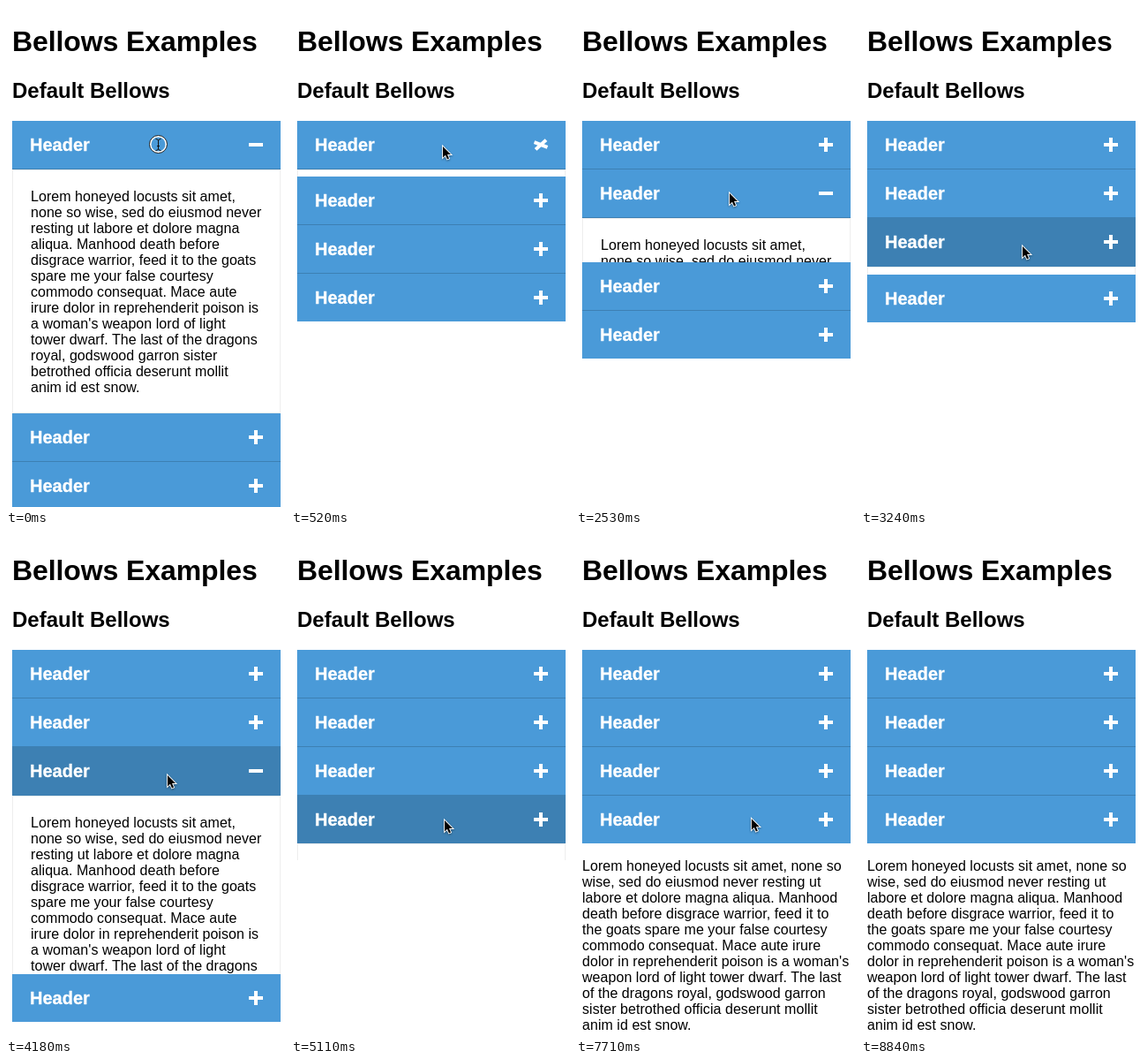
Write an HTML page that moves like this. It is 316 px wide and 567 px high and loops after 9320 ms.

```html
<!DOCTYPE html>
<html lang="en">
<head>
<meta charset="utf-8">
<title>Bellows Examples</title>
<style>
html, body { margin: 0; width: 100%; height: 100%; overflow: hidden; background: #fff; }
body { position: relative; font: 16px/18px "Liberation Sans", Arial, sans-serif; color: #000; }
h1, h2, #list, #after, svg.pointer { position: absolute; margin: 0; left: 7px; white-space: pre; }
h1 { top: 22px; font-size: 32px; line-height: 36px; letter-spacing: -.1px; }
h2 { top: 82px; font-size: 24px; line-height: 27px; }
#list { top: 130px; width: 304px; }
#after { top: 366px; }
#after, .text { letter-spacing: .05px; }
.head { position: relative; height: 54px; padding-left: 20px; font: bold 20px/54px "Liberation Sans", Arial, sans-serif;
  color: #fff; background: #4a9ad8; border-bottom: 1px solid #3d80b3; -webkit-text-stroke: .3px #fff; }
.item:last-child .head { border-bottom: 0; }
.head.down { background: #3d80b3; }
.head i { position: absolute; left: 268px; top: 25px; width: 16px; height: 4px; background: #fff; }
.panel { overflow: hidden; }
.text { box-sizing: border-box; height: 276px; padding: 21px 20px 0; border: 1px solid #eee; background: #fff; }
svg.pointer { left: 0; top: 0; overflow: visible; }
</style>
</head>
<body>
<h1>Bellows Examples</h1>
<h2>Default Bellows</h2>
<div id="list"></div>
<div id="after"></div>
<svg class="pointer" id="arrow" width="14" height="20">
  <path d="M1 2V14.5L4 11.8L6 16.4L8 15.5L6 11H10Z" stroke="#fff" stroke-width="1.8" paint-order="stroke"
    style="filter:drop-shadow(0 1px 1px #0006)"/>
</svg>
<svg class="pointer" id="ring" width="316" height="200" fill="none">
  <circle cx="172.5" cy="156.5" r="9" stroke="#fff" stroke-width="2"/>
  <circle cx="172.5" cy="156.5" r="10" stroke="#222"/>
  <path d="M169.5 150.5q3 0 3 2q0-2 3-2M172.5 152V162M169.5 163.5q3 0 3-2q0 2 3 2M171 158.5h3" stroke="#111"/>
</svg>
<script>
const LOOP = 9320, FULL = 276, SLIDE = 330, PRESS = 130;
// "|" breaks the line inside a panel, "/" in the paragraph below the list
const COPY = "Lorem honeyed locusts sit amet,| none so/ wise, sed do eiusmod never| resting ut/ labore et dolore magna| " +
  "aliqua. Manhood/ death before| disgrace warrior, feed it to/ the goats| spare me your false courtesy|/ " +
  "commodo consequat. Mace aute| irure/ dolor in reprehenderit poison is| a woman's/ weapon lord of light| " +
  "tower dwarf. The last/ of the dragons| royal, godswood garron/ sister| betrothed officia deserunt mollit|/ anim id est snow.";
const wrap = (mark, other) => COPY.replaceAll(other, "").replaceAll(mark + " ", "\n");

// When each item is clicked open and clicked closed
const clicks = [[-1000, 230], [1250, 2300], [3200, 4060], [5050, 6050]];
// Pointer: time, x, y
const path = [[0, 171, 157], [870, 171, 157], [1100, 173, 210], [2700, 173, 210], [3120, 182, 270], [4500, 182, 270],
  [4990, 173, 321], [6890, 173, 321], [7300, 195, 266], [7400, 195, 266], [7770, 198, 322], [7830, 198, 322],
  [8330, 214, 195], [8510, 214, 195], [8840, 264, 541]];

const $ = id => document.getElementById(id);
const clamp = v => Math.max(0, Math.min(1, v));
const ease = v => v < .5 ? 2 * v * v : 1 - 2 * (1 - v) ** 2;
const ramp = (t, start, length) => ease(clamp((t - start) / length));
const show = (el, on) => el.style.display = on ? "block" : "none";

$("after").textContent = wrap("/", "|");
const items = clicks.map(([open, close]) => {
  const el = document.createElement("div");
  el.className = "item";
  el.innerHTML = '<div class="head">Header<i></i><i></i></div><div class="panel"><div class="text"></div></div>';
  el.querySelector(".text").textContent = wrap("|", "/");
  $("list").append(el);
  const [head, panel] = el.children;
  return { open, close, head, panel, bars: head.querySelectorAll("i") };
});

function drawItem({ open, close, head, panel, bars }, t) {
  const height = Math.round(FULL * (ramp(t, open, SLIDE) - ramp(t, close, SLIDE)));
  const turn = ramp(t, open + 110, 200) - ramp(t, close + 255, 105);
  panel.style.height = height + "px";
  head.classList.toggle("down", [open, close].some(c => t >= c && t < c + PRESS));
  bars[0].style.transform = `rotate(${180 * turn}deg)`;
  bars[1].style.transform = `rotate(${90 - 90 * turn}deg)`;
  return t >= open && t < close + SLIDE;
}

function drawPointer(t) {
  show($("ring"), t < 60);
  show($("arrow"), t >= 60 && t < 8840);
  const next = path.findIndex(p => p[0] > t);
  if (next < 1) return;
  const [t0, x0, y0] = path[next - 1], [t1, x1, y1] = path[next];
  const k = ramp(t, t0, t1 - t0);
  $("arrow").style.transform = `translate(${x0 + (x1 - x0) * k}px, ${y0 + (y1 - y0) * k}px)`;
}

function frame(now) {
  const t = now % LOOP;
  const busy = items.map(item => drawItem(item, t)).some(Boolean);
  show($("after"), !busy);
  drawPointer(t);
  requestAnimationFrame(frame);
}
frame(0);
</script>
</body>
</html>
```
